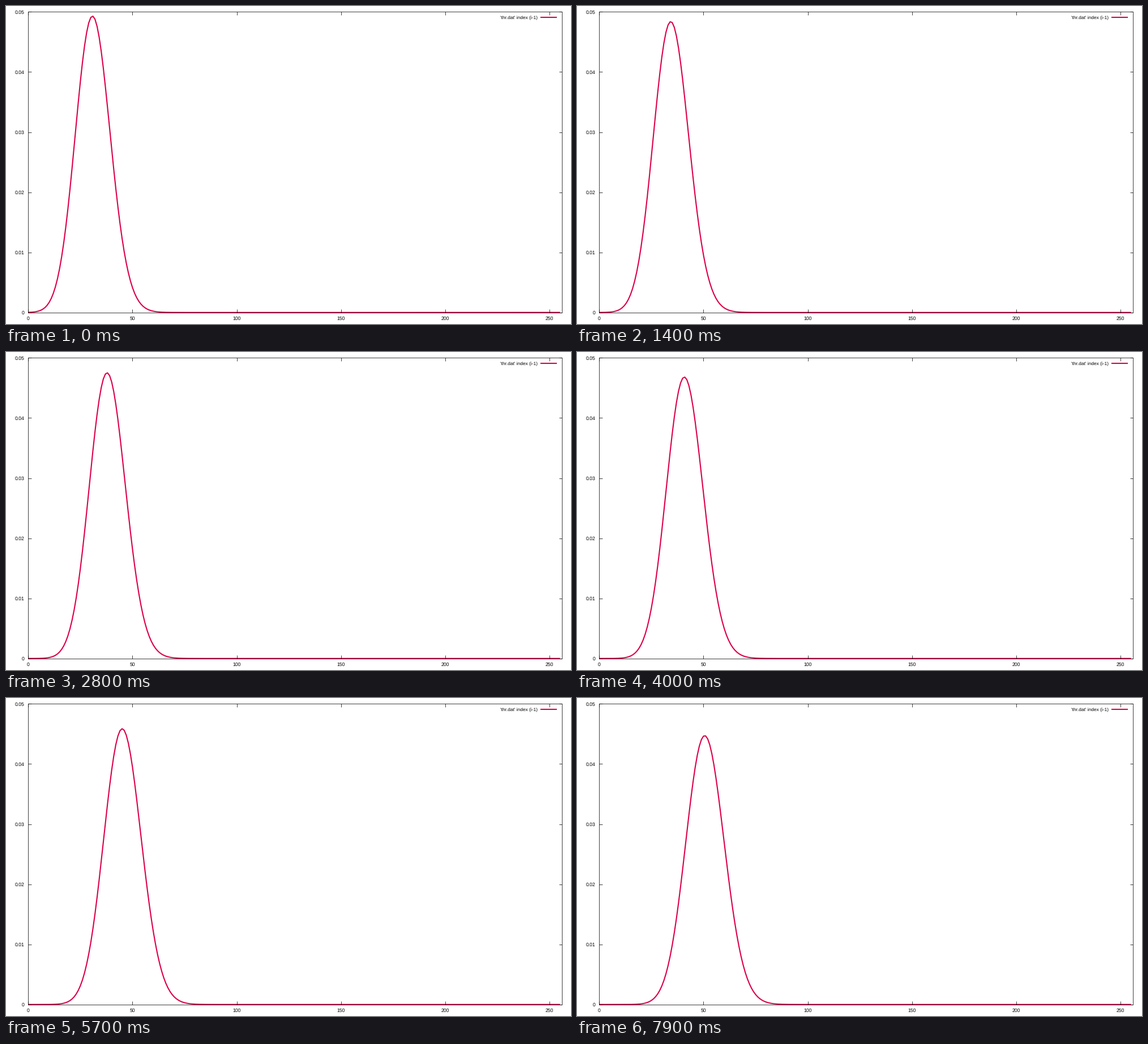
Write a matplotlib script that moves like this. It is 998 by 561 pixels and loops after 8 s.

```python
import numpy as np
import matplotlib.pyplot as plt
from matplotlib.animation import FuncAnimation

plt.rcParams["font.family"] = "Liberation Sans"
plt.rcParams["text.hinting"] = "no_hinting"

W, H, DPI = 998, 561, 100
LEFT, RIGHT, TOP, BOTTOM = 39.3, 982.3, 10.4, 540.7
X_MAX, Y_MAX = 256, 0.05
CRIMSON = "#dd0048"
FRAMES, WARMUP = 80, 341
COURANT, START, DECAY, MASS = 0.25, 200, 0.66, 1.028


def pt(px):
    return px * 72 / DPI


def sx(x):
    return LEFT + x * (RIGHT - LEFT) / X_MAX


def sy(y):
    return BOTTOM - y * (BOTTOM - TOP) / Y_MAX


def advect(steps):
    """Periodic upwind transport of a short exponential pulse."""
    u = np.where(cells >= START, DECAY ** (cells - float(START)), 0)
    u *= MASS / u.sum()
    for _ in range(steps):
        u = u + COURANT * (np.roll(u, 1) - u)
    return u


fig = plt.figure(figsize=(W / DPI, H / DPI), dpi=DPI, facecolor="white")
ax = fig.add_axes([0, 0, 1, 1])
ax.set_xlim(0, W)
ax.set_ylim(H, 0)
ax.axis("off")


def rule(xs, ys):
    ax.plot(xs, ys, color="black", lw=pt(0.75), zorder=3, snap=True,
            solid_capstyle="butt", solid_joinstyle="miter")


def label(x, y, text, ha, size=8.7):
    ax.text(x, y + 0.35 * size, text, ha=ha, va="baseline",
            fontsize=pt(size), color="black", zorder=4)


def stroke(xs, ys):
    return ax.plot(xs, ys, color=CRIMSON, lw=pt(2.1), zorder=2,
                   solid_capstyle="butt", solid_joinstyle="round")[0]


rule([LEFT, RIGHT, RIGHT, LEFT, LEFT], [BOTTOM, BOTTOM, TOP, TOP, BOTTOM])

TICK = 5.7
for i in range(6):
    x, y = sx(50 * i), sy(0.01 * i)
    rule([x, x], [BOTTOM, BOTTOM - TICK])
    rule([x, x], [TOP, TOP + TICK])
    rule([LEFT, LEFT + TICK], [y, y])
    rule([RIGHT, RIGHT - TICK], [y, y])
    label(x, 550.6, str(50 * i), "center")
    label(32.2, y, f"{0.01 * i:g}", "right")

label(939, 20.2, "'thr.dat' index (i-1)", "right", 8.35)
stroke([944.3, 972.8], [20.2, 20.2])

cells = np.arange(X_MAX)
curve = stroke(sx(cells), sy(np.zeros(X_MAX)))


def update(k):
    curve.set_ydata(sy(advect(WARMUP + k)))
    return (curve,)


anim = FuncAnimation(fig, update, frames=FRAMES, interval=100,
                     repeat=True, repeat_delay=0, blit=False)
plt.show()
```
